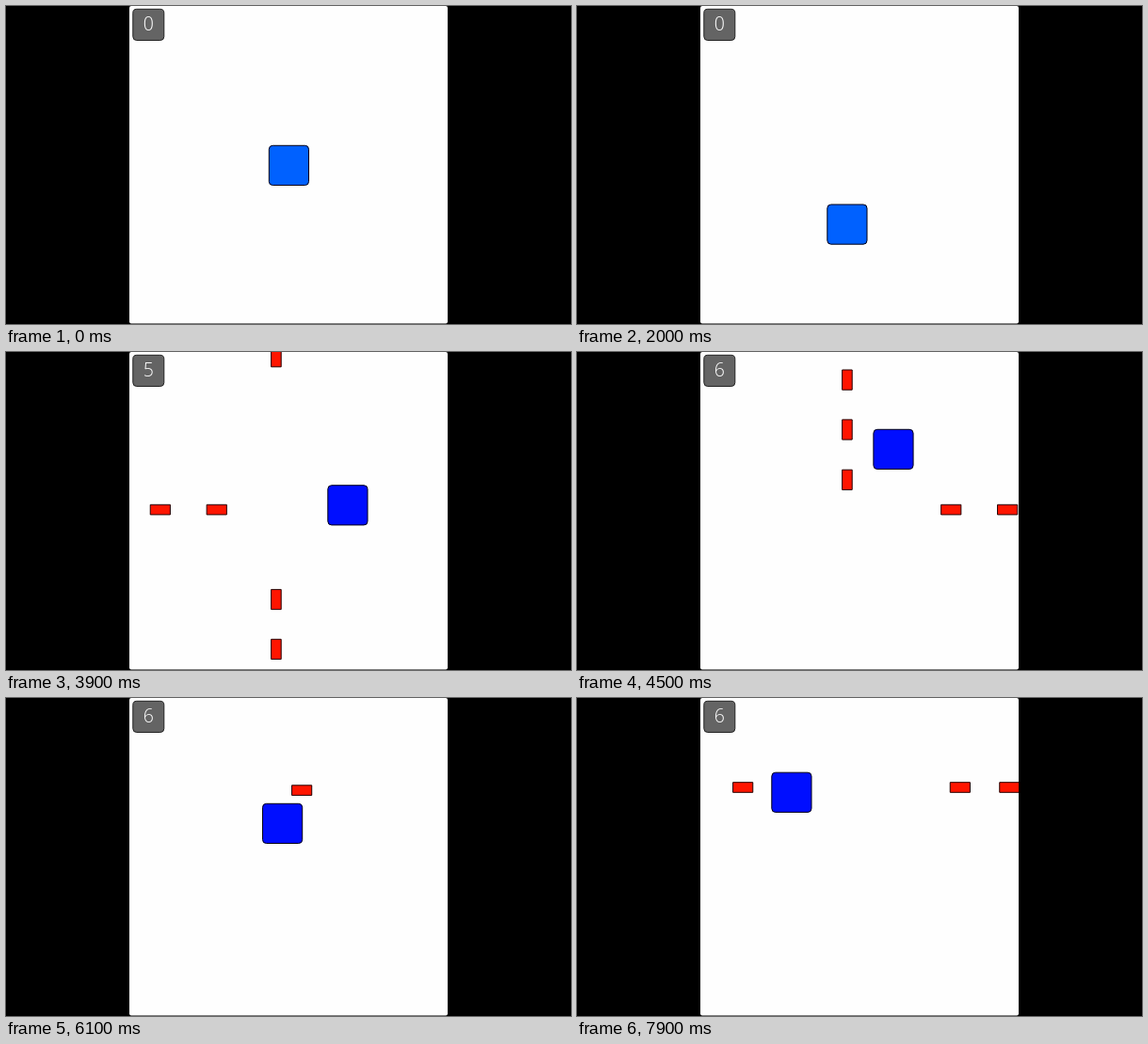
Recreate the animation shown at these times as an HTML page with a canvas. Size 600 by 338 pixels, loop 8000 ms.

```html
<!DOCTYPE html>
<html lang="en">
<head>
<meta charset="utf-8">
<title>Square shooter</title>
<style>
  html, body { margin: 0; width: 100%; height: 100%; overflow: hidden; background: #000; }
  canvas { display: block; width: 600px; height: 338px; }
</style>
</head>
<body>
<canvas id="stage" width="600" height="338"></canvas>
<script>
const ctx = document.getElementById('stage').getContext('2d');
const LOOP = 8000, STEP = 100;
const LEFT = 131, SIZE = 338;
const PLAYER = 42.2, LONG = 21.2, SHORT = 10.6;
const WALK = 0.144, FLIGHT = 0.389;   // px per ms
const WRAP = 364, MARGIN = 22;

// start time, axis, distance
const moves = [
  [350, 'x', -72.5], [1150, 'y', 62.7], [1590, 'x', 59],
  [2400, 'y', -59.2], [2697, 'x', 76],
  [3830, 'y', -69.5], [4313, 'x', -69.3],
  [5800, 'y', 30], [6810, 'y', -33.1], [6840, 'x', -65.7]
];

// fire time, axis, direction, wraps before it disappears
const shots = [
  [2108, 'y', -1, 2], [2244, 'y', -1, 2], [2381, 'y', -1, 2],
  [3322, 'x', 1, 1], [3476, 'x', 1, 1],
  [5217, 'x', -1, 1], [6080, 'y', 1, 1],
  [7305, 'x', 1, 1], [7440, 'x', 1, 1], [7767, 'x', -1, 1]
];

function playerAt(t) {
  const p = { x: 279.3, y: 148.3 };
  for (const [start, axis, dist] of moves) {
    const walked = Math.min(Math.max(0, t - start) * WALK, Math.abs(dist));
    p[axis] += Math.sign(dist) * walked;
  }
  return p;
}

function shotAt(t, [fired, axis, dir, maxLaps]) {
  if (t < fired) return null;
  const p = playerAt(fired);
  const upright = axis === 'y';
  p.x += upright ? (PLAYER - SHORT) / 2 : (PLAYER - LONG) / 2;
  p.y += (PLAYER - LONG) / 2;
  const low = (upright ? 0 : LEFT) - MARGIN;
  const raw = p[axis] + dir * FLIGHT * (t - fired);
  const turns = Math.floor((raw - low) / WRAP);
  p[axis] = raw - turns * WRAP;
  const laps = Math.abs(turns);
  return {
    ...p, w: upright ? SHORT : LONG, h: upright ? LONG : SHORT,
    alive: laps <= maxLaps,
    points: upright && dir < 0 ? Math.min(laps, maxLaps) : 0
  };
}

function box(x, y, w, h, r, fill, stroke) {
  ctx.beginPath();
  ctx.roundRect(x, y, w, h, r);
  ctx.fillStyle = fill;
  ctx.fill();
  if (stroke) {
    ctx.strokeStyle = stroke;
    ctx.stroke();
  }
}

function draw(t) {
  const flying = shots.map(s => shotAt(t, s)).filter(Boolean);
  const score = flying.reduce((sum, s) => sum + s.points, 0);
  const player = playerAt(t);

  ctx.fillStyle = '#000';
  ctx.fillRect(0, 0, 600, 338);
  ctx.lineWidth = 1;
  box(LEFT, 0, SIZE, SIZE - 0.5, 2, '#fefefe');

  ctx.save();
  ctx.beginPath();
  ctx.rect(LEFT, 0, SIZE, SIZE);
  ctx.clip();
  for (const s of flying) {
    if (s.alive) box(s.x, s.y, s.w, s.h, 0, '#ff1500', '#200');
  }
  box(player.x, player.y, PLAYER, PLAYER, 4, score >= 5 ? '#000eff' : '#0061ff', '#001');
  ctx.restore();

  box(134.8, 3.3, 33, 33.2, 4, '#646464', '#222');
  ctx.fillStyle = '#fff';
  ctx.font = '300 19.5px "Open Sans", "Noto Sans", sans-serif';
  ctx.textAlign = 'center';
  ctx.textBaseline = 'alphabetic';
  ctx.fillText(score, 151.2, 26.2);
}

const begin = performance.now();
function tick() {
  const t = (performance.now() - begin) % LOOP;
  draw(Math.floor(t / STEP) * STEP);
  requestAnimationFrame(tick);
}
tick();
</script>
</body>
</html>
```
